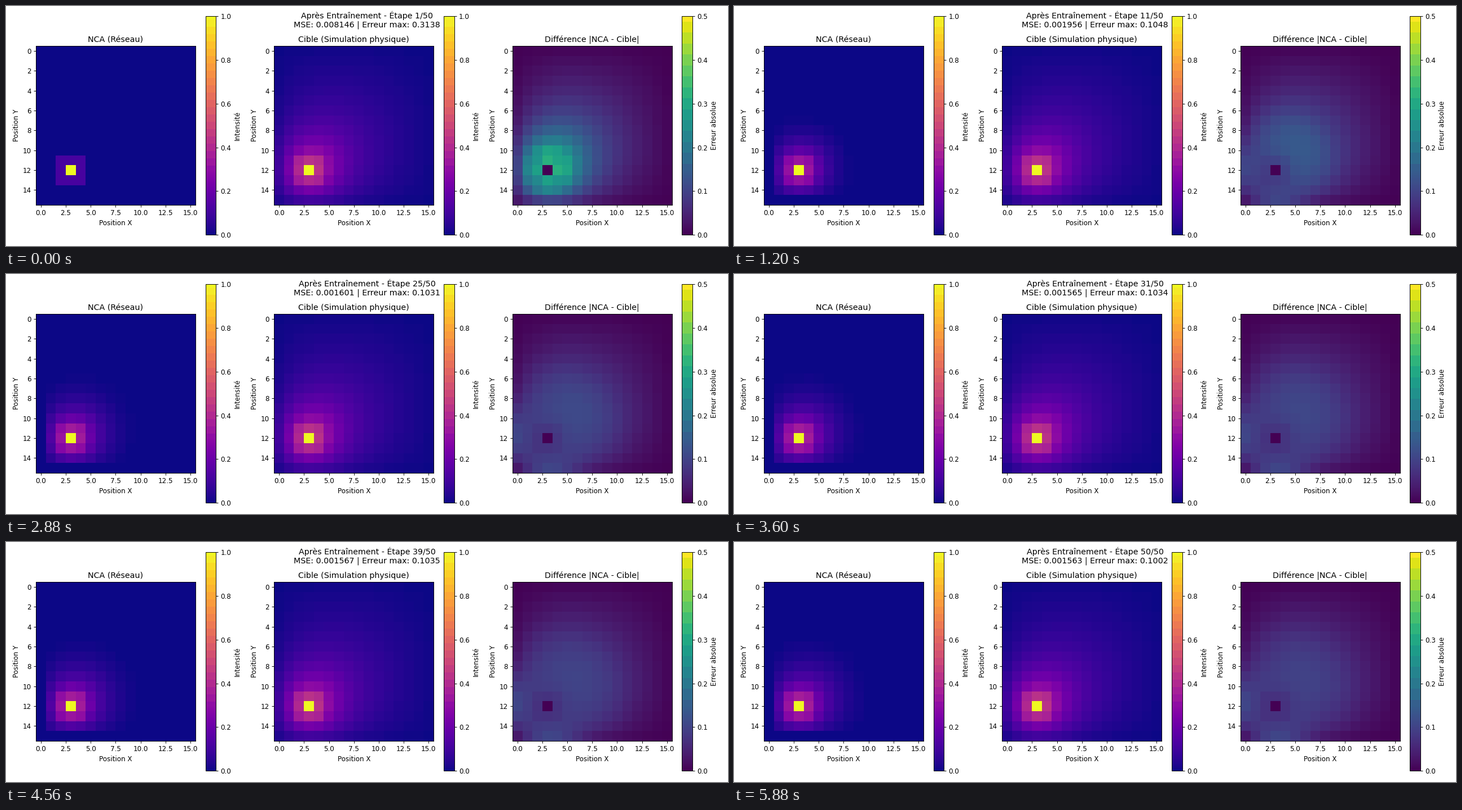
Write a matplotlib script that moves like this. It is 1280x427 px and loops after 6000 ms.

```python
import numpy as np
import matplotlib.pyplot as plt
from matplotlib.animation import FuncAnimation
from matplotlib.cm import ScalarMappable
from matplotlib.colors import ListedColormap, Normalize

W, H = 1280, 427
DPI = W / 15
N = 16
STEPS = 50
SRC = (12, 3)  # row, column of the heat source

# Measured error at a few training steps
KEY_STEPS = [1, 5, 11, 19, 31, 39, 50]
KEY_MSE = [0.008146, 0.003093, 0.001956, 0.001648, 0.001565, 0.001567, 0.001563]
KEY_MAX = [0.3138, 0.1517, 0.1048, 0.1028, 0.1034, 0.1035, 0.1002]


def spread(u):
    """Mean of the eight neighbours, with zeros outside the grid."""
    p = np.pad(u, 1)
    total = sum(p[i:i + N, j:j + N] for i in range(3) for j in range(3))
    return (total - u) / 8


def start_grid():
    u = np.zeros((N, N))
    u[SRC] = 1
    return u


def physical_field():
    u = start_grid()
    for _ in range(900):
        u = spread(u)
        u[SRC] = 1
    return u


def network_states():
    """Diffusion with a fading leak and dead cells on the left and bottom."""
    u, states = start_grid(), []
    for step in range(1, STEPS + 1):
        leak = 0.0017 + 0.03 / (step + 2)
        for _ in range(1 if step == 1 else 2):
            u = np.maximum(spread(u) - leak, 0)
            u[:, 0] = 0
            u[-1, :] = 0
            u[SRC] = 1
        states.append(u)
    return states


def metric(step, values):
    return np.exp(np.interp(np.log(step), np.log(KEY_STEPS), np.log(values)))


def banded(name, bands):
    """Colour scale that is smooth when dark and stepped above."""
    v = np.linspace(0, 1, 780)
    v = np.where(v < 0.3, v, np.round(v * bands) / bands)
    return ListedColormap(plt.get_cmap(name)(v))


def add_box(x, y, w, h):
    return fig.add_axes([x / W, 1 - (y + h) / H, w / W, h / H])


def add_panel(col, title, data, cmap, vmax, bands, label):
    x = 53 + 422.4 * col
    ax = add_box(x, 71.2, 282.7, 282.7)
    im = ax.imshow(data, cmap=cmap, vmin=0, vmax=vmax,
                   interpolation="nearest", aspect="auto")
    ax.set_title(title)
    ax.set_xlabel("Position X")
    ax.set_ylabel("Position Y")
    ax.set_xticks(np.arange(0, 15.1, 2.5))
    ax.set_yticks(range(0, 15, 2))
    cax = add_box(x + 300.5, 18, 18.8, 389.3)
    scale = ScalarMappable(Normalize(0, vmax), banded(cmap, bands))
    fig.colorbar(scale, cax=cax, label=label,
                 ticks=np.linspace(0, vmax, 6))
    return im


target = physical_field()
states = network_states()

fig = plt.figure(figsize=((W + 0.01) / DPI, (H + 0.01) / DPI), dpi=DPI,
                 facecolor="white")
net_im = add_panel(0, "NCA (Réseau)", states[0], "plasma", 1, 30, "Intensité")
add_panel(1, "Cible (Simulation physique)", target, "plasma", 1, 30, "Intensité")
diff_im = add_panel(2, "Différence |NCA - Cible|", abs(states[0] - target),
                    "viridis", 0.5, 20, "Erreur absolue")
heading = fig.suptitle("")


def update(i):
    step = i + 1
    net_im.set_data(states[i])
    diff_im.set_data(np.abs(states[i] - target))
    heading.set_text(
        f"Après Entraînement - Étape {step}/{STEPS}\n"
        f"MSE: {metric(step, KEY_MSE):.6f} | "
        f"Erreur max: {metric(step, KEY_MAX):.4f}")
    return net_im, diff_im, heading


anim = FuncAnimation(fig, update, frames=STEPS, interval=120,
                     init_func=lambda: update(0), repeat=True, blit=False)
plt.show()
```
